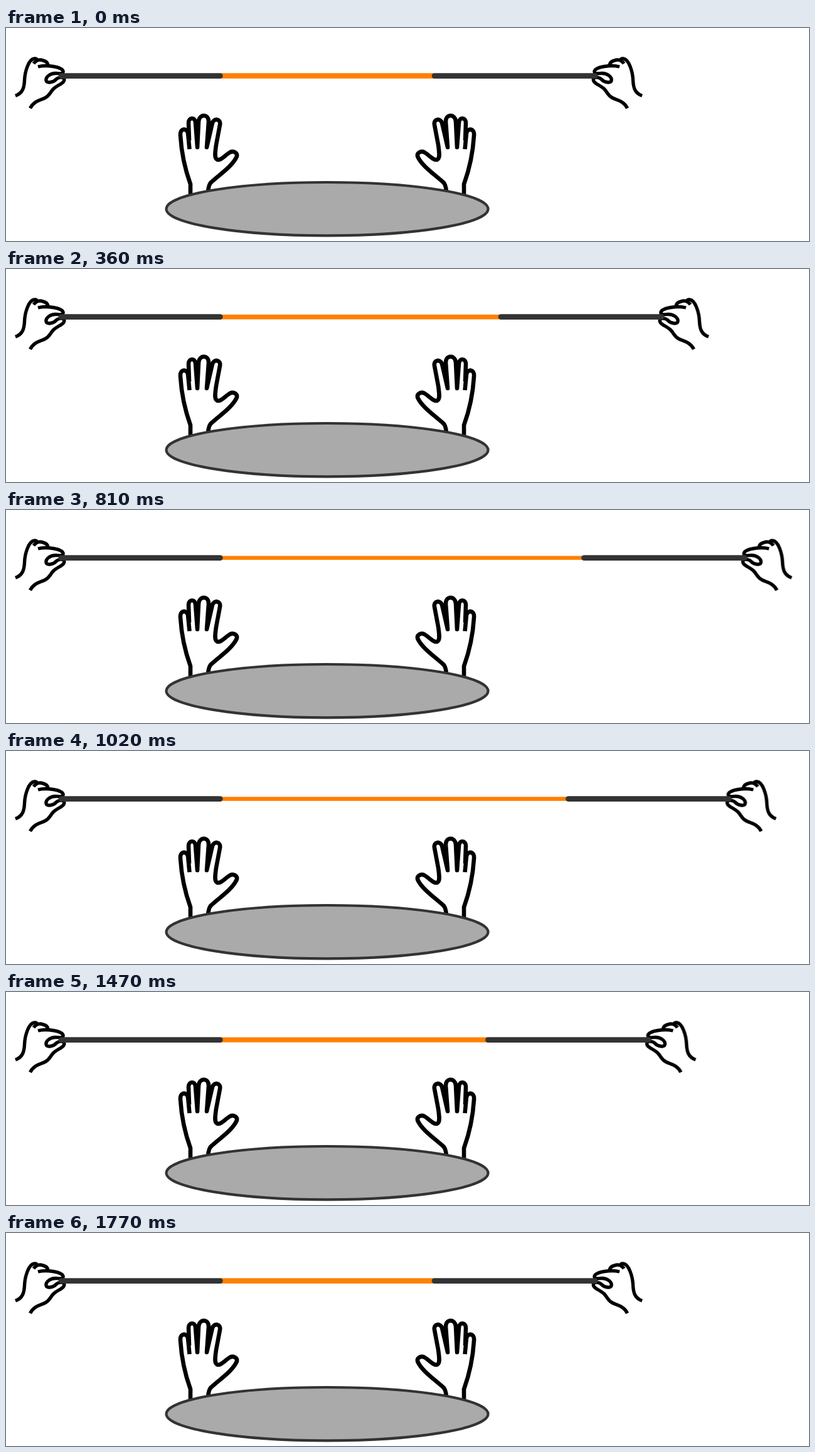
Animation of 1280 by 341 pixels, one loop 1800 ms. Source, as an HTML page without scripts:

```html
<!DOCTYPE html>
<html lang="en">
<head>
<meta charset="utf-8">
<title>Stretching band</title>
<style>
  html, body { margin: 0; width: 100%; height: 100%; overflow: hidden; background: #fff; }
  svg { display: block; width: 100%; height: 100%; }

  .pinch, .palm { fill: none; stroke: #000; stroke-linejoin: round; }
  .pinch { stroke-width: 5.4; }
  .palm { stroke-width: 6.6; }
  .cord { stroke: #333; stroke-width: 8.6; stroke-linecap: round; }
  .table { fill: #aaa; stroke: #333; stroke-width: 4.2; }
  .band { fill: #ff8000; transform-origin: 341.33px 76.6px; animation: stretch 1.8s infinite; }
  .puller { animation: pull 1.8s infinite; }

  /* 30 ms ticks: 29 out, 30 back, one at rest */
  @keyframes pull {
    0% { transform: translateX(0); animation-timing-function: steps(29); }
    48.3333% { transform: translateX(256px); animation-timing-function: steps(30); }
    98.3333%, 100% { transform: translateX(0); }
  }
  @keyframes stretch {
    0% { transform: scale(1, 1); animation-timing-function: steps(29); }
    48.3333% { transform: scale(1.75, .7); animation-timing-function: steps(30); }
    98.3333%, 100% { transform: scale(1, 1); }
  }
</style>
</head>
<body>
<svg viewBox="0 0 1280 341">
  <defs>
    <g id="pinch" class="pinch">
      <path d="M15 108.500C27 104 29 95 29.500 84C30 70 36 50 45 49C48 48.500 50 50.500 51 53"/>
      <path d="M44 57C48 51 54 50 59 52C64 53 66 55 67 59"/>
      <path d="M51 62C58 60 66 60 75 61.500C84 63 92 66 91 70.500C90 74 85 73 80 72.500C71 72 63 78 64 84C65 89 76 87 80 82C83 79 90 78 92.500 80.500C95 88 84 90 76 97C70 103 70 108 62 112C54 116 44 117 38.500 128.500"/>
    </g>
    <g id="palm" class="palm">
      <path d="M294 270V250C286 228 280 205 278 172C277 160 288 160 290 168L292.500 194"/>
      <path d="M292 180L291 152C291 143 301 142 302 151L305 191L307 150C308 137 323 137 323 150L320 191L329 152C331 144 343 145 341 155L335 187C333 201 332 209 337 211C343 212 350 203 357 199C363 196 370 200 367.500 206.500C360 222 340 235 326 248C323 252 322 258 322 266"/>
    </g>
  </defs>

  <use href="#palm"/>
  <use href="#palm" transform="translate(1024) scale(-1 1)"/>
  <ellipse class="table" cx="512" cy="289.700" rx="256.500" ry="42.700"/>

  <rect class="band" x="341.330" y="72.300" width="341.330" height="8.600"/>
  <use href="#pinch"/>
  <path class="cord" d="M88 76.600H341.330"/>
  <g class="puller">
    <use href="#pinch" transform="translate(1029) scale(-1 1)"/>
    <path class="cord" d="M683 76.600H939"/>
  </g>
</svg>
</body>
</html>
```
